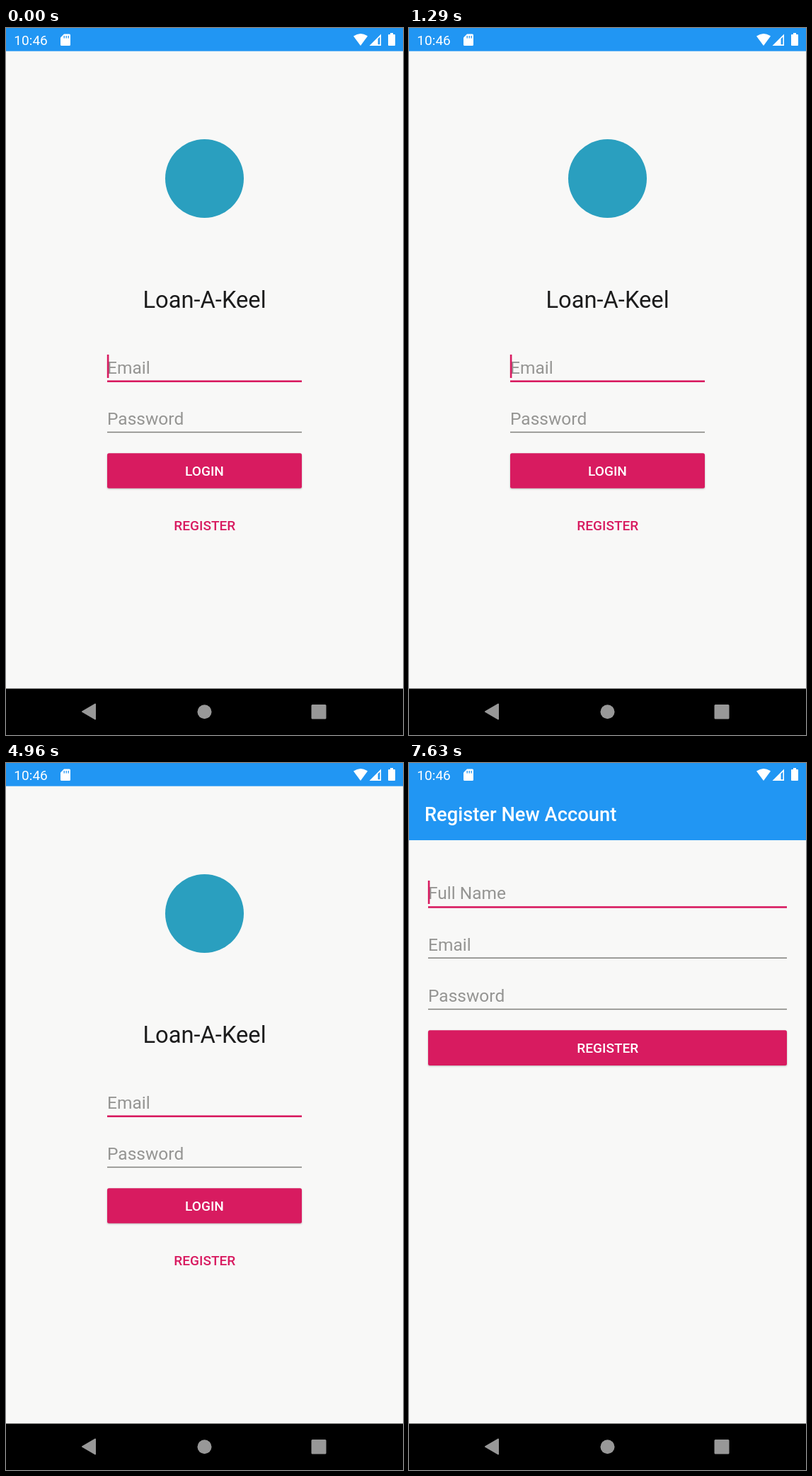
These frames come from a looping animation (561x998 px, 8 s). An HTML page:

```html
<!DOCTYPE html>
<html lang="en">
<head>
<meta charset="utf-8">
<title>Login and register</title>
<style>
  html, body { margin: 0; width: 100%; height: 100%; overflow: hidden; background: #000; }
  svg { display: block; width: 100%; height: 100%; font-family: Roboto, sans-serif; }
  .screen { transform-origin: 280.5px 499px; }
  .hint { font-size: 24.5px; fill: #959593; }
  .title { font-size: 32.7px; fill: #1c1c1c; text-anchor: middle; }
  .bar { font-size: 27.3px; font-weight: 500; fill: #fff; }
  .label { font-size: 19.1px; font-weight: 500; text-anchor: middle; }
  .clock { font-size: 19.1px; fill: #fff; }
  .blue { fill: #2196f3; }
  .page { fill: #f8f8f7; }
  .pink { fill: #d81b60; }
  .line { fill: #80807c; }
  .white { fill: #fff; }
  .raised { filter: drop-shadow(0 1.2px 1.2px rgba(0, 0, 0, .25)); }
</style>
</head>
<body>
<svg viewBox="0 0 561 998" preserveAspectRatio="none">
  <clipPath id="flatButton"><rect x="143" y="678" width="275" height="49" rx="2.5"/></clipPath>

  <g id="login" class="screen">
    <rect class="page" width="561" height="998"/>
    <rect class="blue" width="561" height="32.7"/>
    <circle cx="280.5" cy="212.5" r="55.5" fill="#2a9fbf"/>
    <text class="title" x="280.5" y="395">Loan-A-Keel</text>
    <text class="hint" x="143" y="487.5">Email</text>
    <rect class="pink" x="143" y="497.4" width="275" height="2.6"/>
    <rect class="pink" id="caret" x="142.8" y="461" width="2.6" height="33"/>
    <text class="hint" x="143" y="559.8">Password</text>
    <rect class="line" x="143" y="569.8" width="275" height="1.5"/>
    <rect class="pink raised" x="143" y="600.2" width="275" height="49.6" rx="2.5"/>
    <text class="label white" x="280.5" y="632.2">LOGIN</text>
    <g clip-path="url(#flatButton)"><circle id="ripple" cx="281" cy="702.5" r="0"/></g>
    <text class="label pink" x="280.8" y="708.9">REGISTER</text>
  </g>

  <g id="register" class="screen">
    <rect class="page" width="561" height="998"/>
    <rect class="blue" width="561" height="109"/>
    <text class="bar" x="22" y="81.5">Register New Account</text>
    <text class="hint" x="27" y="192.3">Full Name</text>
    <rect class="pink" x="27" y="202.2" width="507" height="2.6"/>
    <rect class="pink" x="26.8" y="166" width="2.6" height="33"/>
    <text class="hint" x="27" y="264.6">Email</text>
    <rect class="line" x="27" y="274.5" width="507" height="1.5"/>
    <text class="hint" x="27" y="336.9">Password</text>
    <rect class="line" x="27" y="346.8" width="507" height="1.5"/>
    <rect class="pink raised" x="27" y="377.3" width="507" height="49.6" rx="2.5"/>
    <text class="label white" x="280.8" y="409.4">REGISTER</text>
  </g>

  <!-- status bar -->
  <text class="clock" x="11.3" y="24">10:46</text>
  <path class="white" d="M82 8.5H89.500Q91 8.500 91 10V23.500Q91 25 89.500 25H78.500Q77 25 77 23.500V13.500Z"/>
  <path d="M82.200 11v3.600M85.200 11v3.600M88.200 11v3.600" stroke="#2196f3" stroke-width="1.300"/>
  <path class="white" d="M491 11.500Q501 4.500 511 11.500L501 25Z"/>
  <path class="white" fill-rule="evenodd" d="M530 8.500V25H513.500ZM528.400 12.500L525.600 15.300V23.300H528.400Z"/>
  <path class="white" d="M543 7h4v2h2q1 0 1 1v14q0 1-1 1h-8q-1 0-1-1V10q0-1 1-1h2Z"/>

  <!-- navigation bar -->
  <rect y="932.5" width="561" height="66"/>
  <g fill="#989898">
    <path d="M108 965L126 954.500V975.500Z" stroke="#989898" stroke-width="2" stroke-linejoin="round"/>
    <circle cx="280.500" cy="965.300" r="10"/>
    <rect x="431.500" y="955" width="21" height="20.500" rx="1.500"/>
  </g>
</svg>
<script>
const LOOP = 8000, PRESS = 6920, OPEN = 7230, OPEN_TIME = 400;
const blinks = [790, 1250, 1750, 2290, 2750, 3250, 3750, 4250, 4750, 5250, 5750, 6290, 6790];
const $ = id => document.getElementById(id);
const [login, register, caret, ripple] = ['login', 'register', 'caret', 'ripple'].map($);
const clamp = v => Math.max(0, Math.min(1, v));
const cubic = (a, b, c, d, u) =>
  a * (1 - u) ** 3 + 3 * b * u * (1 - u) ** 2 + 3 * c * u * u * (1 - u) + d * u ** 3;

// Two joined Bezier pieces: a quick start, then a very slow finish
function ease(x) {
  const [xs, ys] = x < 1 / 6
    ? [[0, .05, .1333, 1 / 6], [0, 0, .06, .4]]
    : [[1 / 6, .2083, .25, 1], [.4, .82, 1, 1]];
  let lo = 0, hi = 1;
  for (let i = 0; i < 20; i++) {
    const mid = (lo + hi) / 2;
    if (cubic(...xs, mid) < x) lo = mid; else hi = mid;
  }
  return cubic(...ys, lo);
}

function show(screen, scale, opacity) {
  screen.style.transform = scale === 1 ? 'none' : `scale(${scale})`;
  screen.style.opacity = opacity;
}

function draw(t) {
  caret.style.opacity = blinks.filter(b => t >= b).length % 2 ? 0 : 1;

  const press = clamp((t - PRESS) / 225);
  ripple.setAttribute('r', press ? 28 + 114 * press : 0);
  ripple.style.opacity = .12 * clamp((t - PRESS) / 75);

  // The old screen grows behind while the new one fades and zooms in
  const open = clamp((t - OPEN) / OPEN_TIME);
  const p = open < 1 ? ease(open) : 1;
  show(login, 1 + .15 * p, 1);
  show(register, .85 + .15 * p, clamp((t - OPEN - 35) / 50));
}

const start = performance.now();
function tick() {
  draw((performance.now() - start) % LOOP);
  requestAnimationFrame(tick);
}
tick();
</script>
</body>
</html>
```
